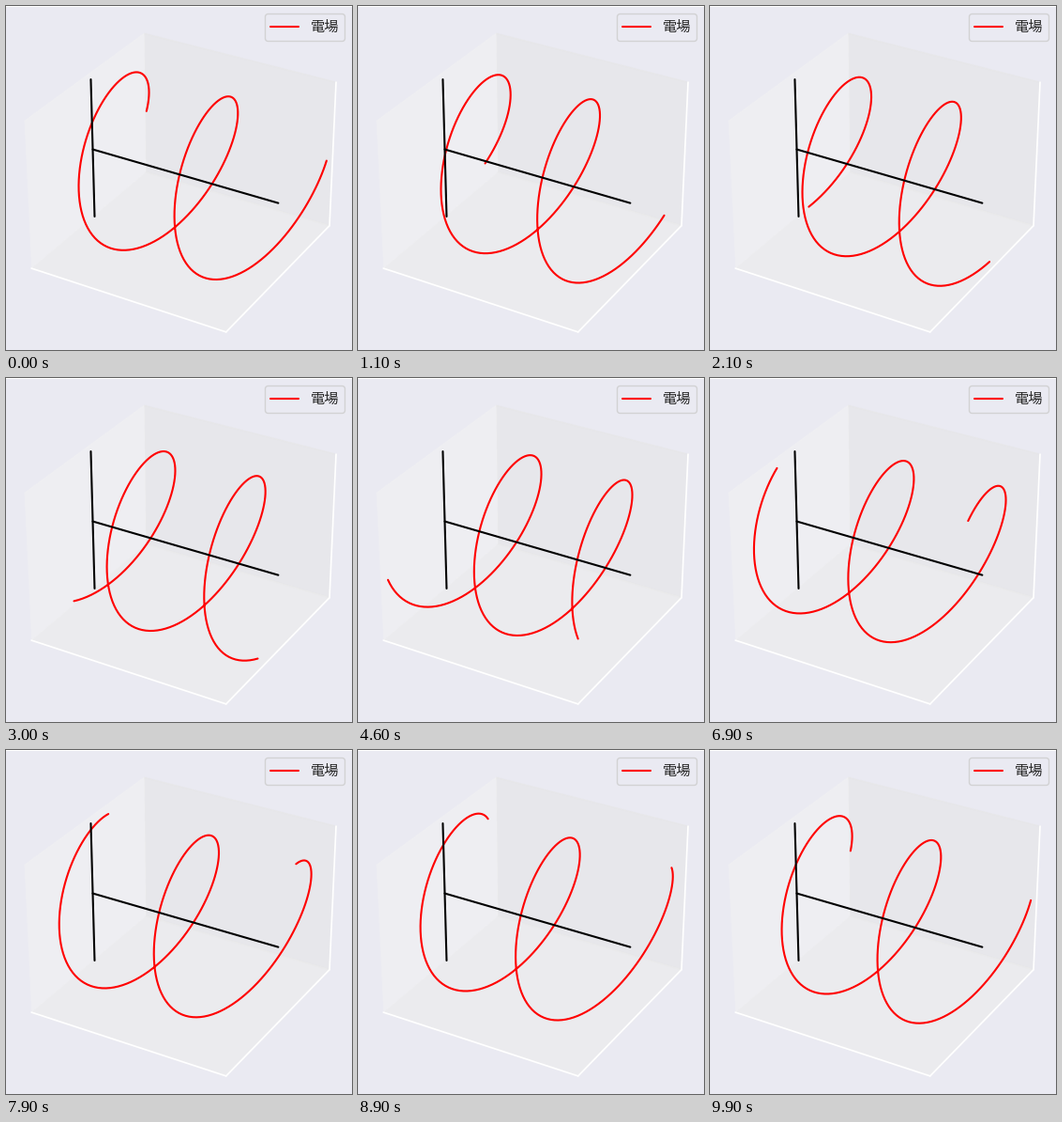
Animation, 369 px wide and 366 px high, one loop 10 s. Source, as a matplotlib script:

```python
import numpy as np
import matplotlib.pyplot as plt
from matplotlib.animation import FuncAnimation

W, H, DPI = 369, 366, 100
SIDE = 369.6              # square axes, slightly larger than the stage
LEFT, TOP = -0.8, 0.6     # axes corner in pixels
FRAMES, INTERVAL = 100, 100
TURNS = 2

plt.rcParams.update({
    "font.family": "Noto Sans CJK JP",
    "text.color": ".15",
    "axes.facecolor": "#EAEAF2",
    "axes.edgecolor": "white",
    "axes.linewidth": 1.25,
    "lines.linewidth": 1.5,
    "lines.solid_capstyle": "round",
    "legend.fontsize": 11,
})

fig = plt.figure(figsize=(W / DPI, H / DPI), dpi=DPI, facecolor="white")
ax = fig.add_axes([LEFT / W, (H - TOP - SIDE) / H, SIDE / W, SIDE / H],
                  projection="3d")
ax.view_init(elev=30, azim=-60)

lim = 25 / 24             # small margin between the data and the panes
ax.set(xlim=(-lim, lim), ylim=(-lim, lim), zlim=(-lim, lim),
       xticks=[], yticks=[], zticks=[])

x = np.linspace(-1, 1, 200)
phase = TURNS * np.pi * (x + 1)

wave, = ax.plot(x, np.cos(phase), np.sin(phase), color="red", label="電場")
ax.plot([-1, 1], [0, 0], [0, 0], color="black")
ax.plot([-1, -1], [0, 0], [-1, 1], color="black")
ax.legend(loc="upper right")


def update(i):
    angle = phase - 2 * np.pi * (i + 1) / FRAMES
    wave.set_data_3d(x, np.cos(angle), np.sin(angle))
    return wave,


anim = FuncAnimation(fig, update, frames=FRAMES, interval=INTERVAL,
                     repeat=True, repeat_delay=0)
plt.show()
```
